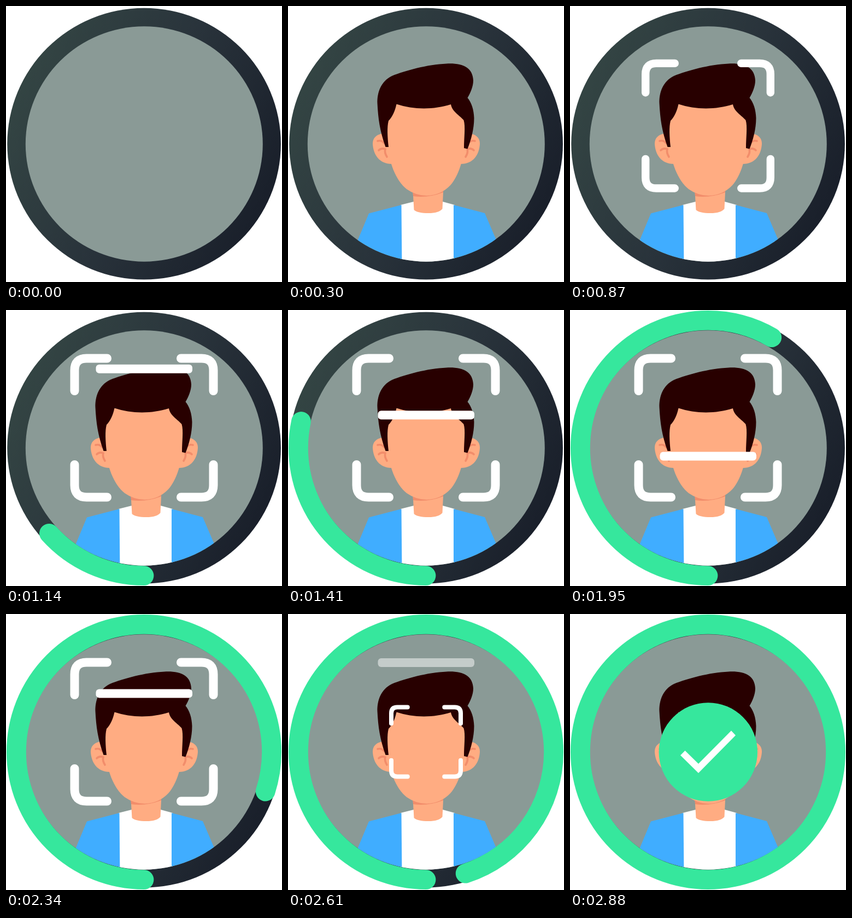
Animation, 505 px wide and 505 px high, one loop 3600 ms. Source, as an HTML page:

```html
<!DOCTYPE html>
<html lang="en">
<head>
<meta charset="utf-8">
<title>Face scan</title>
<style>
  html, body { margin: 0; width: 100%; height: 100%; overflow: hidden; background: #fff; }
  svg { display: block; width: 100vw; height: 100vh; }
</style>
</head>
<body>
<svg viewBox="0 0 505 505">
  <defs>
    <linearGradient id="rim" x1="0.08" y1="0.25" x2="0.95" y2="0.68">
      <stop offset="0" stop-color="#334443"/>
      <stop offset="0.5" stop-color="#29333b"/>
      <stop offset="1" stop-color="#1a202b"/>
    </linearGradient>
    <clipPath id="window"><ellipse cx="252.8" cy="252.5" rx="217" ry="215.2"/></clipPath>
    <g id="ear">
      <path fill="#ffac82" d="M184 234C168 231 155 238 155 252C156 272 167 289 190 289Z"/>
      <path fill="none" stroke="#f28d6b" stroke-width="3.6" stroke-linecap="round"
        d="M164 247Q171 245 176 251M166 264Q171 259 178 262Q176 268 181 276"/>
    </g>
    <path id="corner" d="M125.5 148V110.5Q125.5 88.5 147.5 88.5H185"/>
  </defs>

  <ellipse cx="252.6" cy="252.2" rx="250.3" ry="248.4" fill="url(#rim)"/>
  <ellipse cx="252.8" cy="252.5" rx="217" ry="215.2" fill="#8a9a96"/>

  <g clip-path="url(#window)">
    <g id="person">
      <path fill="#fff" d="M206 364L230 358H283L305 364V480H206Z"/>
      <path fill="#40adff" d="M207.500 364L148 379.500L122 442V480H208.500ZM303 364L360 379L387 442V480H303Z"/>
      <path fill="#ffac82" d="M228 330L230.500 373Q237 379 257 379Q276 379 282.500 371L284.500 330Z"/>
      <path fill="#f28d6b" d="M228 338L229 348Q255 352 284 341V334Z"/>
      <use href="#ear"/>
      <use href="#ear" transform="matrix(-1 0 0 1 506 0)"/>
      <path fill="#ffac82" d="M182 180V250C184 285 197 319 217 335Q234 347 254 347Q280 346 297 328C312 311 322 280 324 245V180Z"/>
      <path fill="#280000" d="M178.500 258H184C182 240 181 221 184 210C191 203 196 192 198.500 179.500C230 190 266 190 298 180C300 193 314 200 321.500 209C325 221 322 240 322 260L328.500 261.500C335 245 340.500 225 340.500 205C340 190 336 177 328.500 168C334 159 339 147 339 136C338 113 320 104 290 105.500C255 107 215 118 190 128C170 138 163 158 163.500 178C165 207 168 228 178.500 258Z"/>
    </g>
  </g>

  <circle id="progress" cx="252.5" cy="252.5" r="233.6" pathLength="360" transform="rotate(90 252.5 252.5)"
    fill="none" stroke="#36e79d" stroke-width="35.8" stroke-linecap="round"/>

  <g id="brackets" fill="none" stroke="#fff" stroke-width="16" stroke-linecap="round">
    <use href="#corner"/>
    <use href="#corner" transform="matrix(-1 0 0 1 505 0)"/>
    <use href="#corner" transform="matrix(1 0 0 -1 0 431)"/>
    <use href="#corner" transform="matrix(-1 0 0 -1 505 431)"/>
  </g>

  <rect id="bar" x="164.500" width="176.500" height="16" rx="6" fill="#fff"/>

  <g id="badge">
    <circle cx="252.800" cy="252.500" r="90.300" fill="#36e79d"/>
    <path fill="#fff" d="M202 258.500L210.500 250L235 274L295 213.500L303 222L235 291Z"/>
  </g>
</svg>
<script>
  const LOOP = 3600, STEP = 30, CENTER = 252.5;
  const [person, progress, brackets, bar, badge] =
    ['person', 'progress', 'brackets', 'bar', 'badge'].map(id => document.getElementById(id));

  const ramp = (t, from, to) => Math.min(1, Math.max(0, (t - from) / (to - from)));
  const pulse = (t, inFrom, inTo, outFrom, outTo) => ramp(t, inFrom, inTo) - ramp(t, outFrom, outTo);
  const show = (el, visible) => el.setAttribute('visibility', visible ? 'visible' : 'hidden');

  function scale(el, k) {
    show(el, k > 0);
    el.setAttribute('transform',
      `translate(${CENTER} ${CENTER}) scale(${k}) translate(${-CENTER} ${-CENTER})`);
  }

  function draw(t) {
    person.setAttribute('opacity', ramp(t, 0, 300));

    const angle = 360 * ramp(t, 900, 2700);
    show(progress, angle > 0);
    progress.setAttribute('stroke-dasharray', angle < 360 ? `${angle} 400` : 'none');

    scale(brackets, pulse(t, 600, 900, 2520, 2700));

    // The bar sweeps down and back at constant speed.
    bar.setAttribute('y', 81 + 225.5 * pulse(t, 1080, 1800, 1800, 2520));
    bar.setAttribute('opacity', pulse(t, 900, 1080, 2520, 2700));

    scale(badge, ramp(t, 2700, 2880));
  }

  const start = performance.now();
  function tick() {
    const t = (performance.now() - start) % LOOP;
    draw(Math.floor(t / STEP) * STEP);
    requestAnimationFrame(tick);
  }
  draw(0);
  requestAnimationFrame(tick);
</script>
</body>
</html>
```
